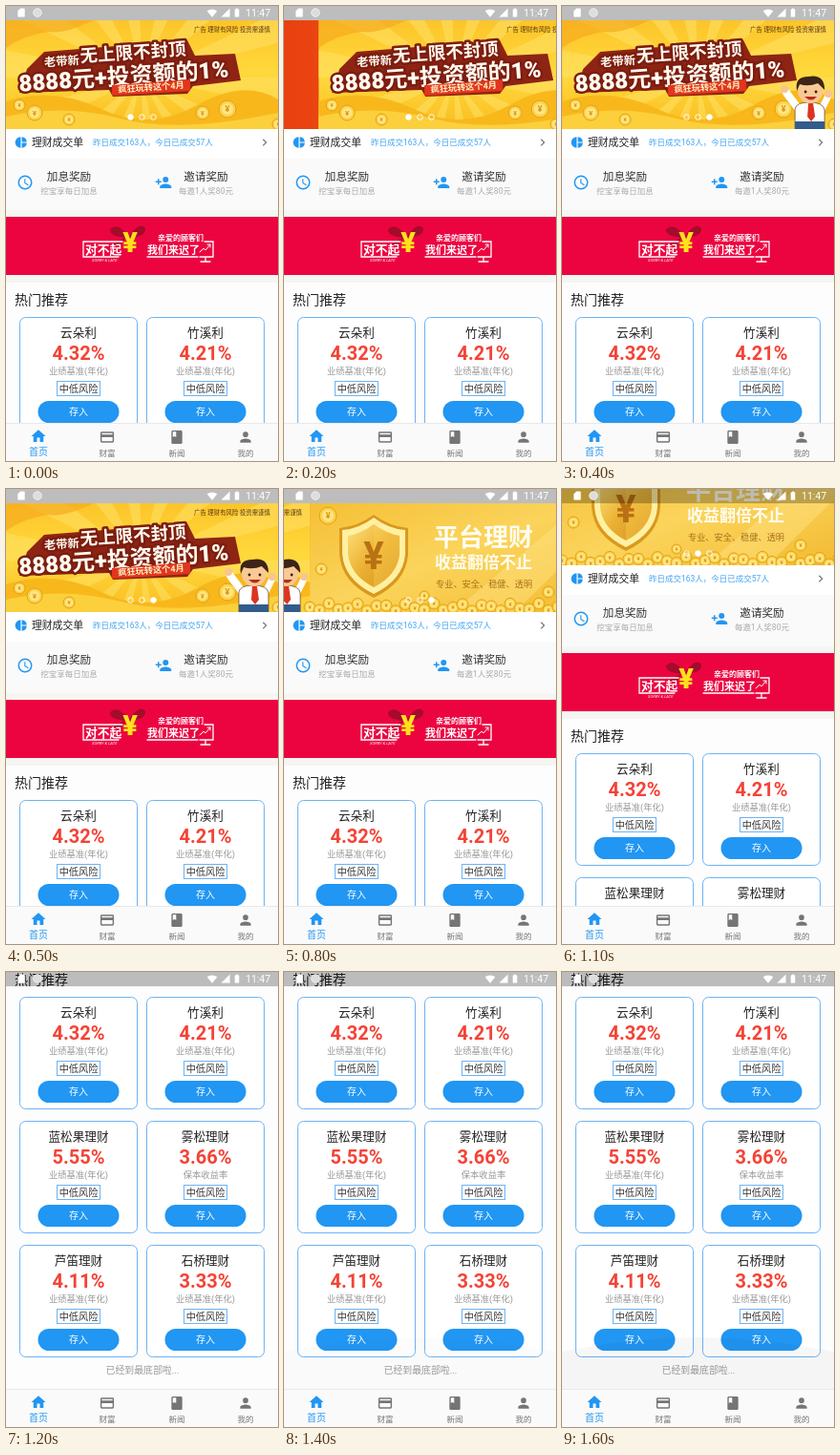
Recreate the animation shown at these times as an HTML page. Size 285x477 px, loop 1900 ms.

```html
<!DOCTYPE html>
<html lang="zh-CN">
<head>
<meta charset="utf-8">
<style>
html, body { margin: 0; width: 100%; height: 100%; overflow: hidden; background: #fff; }
svg { display: block; width: 285px; height: 477px; font-family: Roboto, "Noto Sans CJK SC", sans-serif; }
</style>
</head>
<body>
<svg id="stage" viewBox="0 0 285 477" xmlns="http://www.w3.org/2000/svg"></svg>
<script>
const LOOP = 1900, STEP = 100, W = 285, SCROLL = 300;
const BLUE = '#2196f3', GREY = '#757575';

// Text centred vertically on cy.
const text = (x, cy, size, str, fill, extra = '') =>
  `<text x="${x}" y="${(cy + size * 0.37).toFixed(2)}" font-size="${size}" fill="${fill}" ${extra}>${str}</text>`;
const mid = (x, cy, size, str, fill, extra = '') =>
  text(x, cy, size, str, fill, 'text-anchor="middle" ' + extra);
const rect = (x, y, w, h, fill, extra = '') =>
  `<rect x="${x}" y="${y}" width="${w}" height="${h}" fill="${fill}" ${extra}/>`;
const circle = (x, y, r, fill, extra = '') =>
  `<circle cx="${x}" cy="${y}" r="${r}" fill="${fill}" ${extra}/>`;
const path = (d, fill, extra = '') => `<path d="${d}" fill="${fill}" ${extra}/>`;
const line = (d, color, width) =>
  path(d, 'none', `stroke="${color}" stroke-width="${width}" stroke-linecap="round"`);
// 24-unit icon centred on (x, y).
const icon = (name, x, y, size, fill) =>
  `<g transform="translate(${x - size / 2} ${y - size / 2}) scale(${size / 24})">${path(ICONS[name], fill)}</g>`;

const ICONS = {
  home: 'M10 20v-6h4v6h5v-8h3L12 3 2 12h3v8z',
  card: 'M20 4H4c-1.1 0-2 .9-2 2v12c0 1.1.9 2 2 2h16c1.1 0 2-.9 2-2V6c0-1.1-.9-2-2-2zm0 14H4v-6h16v6zm0-10H4V6h16v2z',
  book: 'M18 2H6c-1.1 0-2 .9-2 2v16c0 1.1.9 2 2 2h12c1.1 0 2-.9 2-2V4c0-1.1-.9-2-2-2zM6 4h5v8l-2.5-1.5L6 12V4z',
  person: 'M12 12a4 4 0 1 0 0-8 4 4 0 0 0 0 8zm0 2c-2.7 0-8 1.3-8 4v2h16v-2c0-2.7-5.3-4-8-4z',
  invite: 'M15 12a4 4 0 1 0 0-8 4 4 0 0 0 0 8zM6 10V7H4v3H1v2h3v3h2v-3h3v-2zm9 4c-2.7 0-8 1.3-8 4v2h16v-2c0-2.7-5.3-4-8-4z',
  clock: 'M12 2a10 10 0 1 0 0 20 10 10 0 0 0 0-20zm0 18a8 8 0 1 1 0-16 8 8 0 0 1 0 16zm.5-13H11v6l5.2 3.2.8-1.3-4.5-2.6z',
  pie: 'M11 2v20a10 10 0 0 1 0-20zm2 0v9h9a10 10 0 0 0-9-9zm0 11v9a10 10 0 0 0 9-9z',
  next: 'M10 6L8.6 7.4l4.6 4.6-4.6 4.6L10 18l6-6z',
  wifi: 'M12 21.5L23.6 7C23 6.600 18.700 3 12 3S1 6.600.4 7z',
  signal: 'M2 22h20V2z',
  battery: 'M15.700 4H14V2h-4v2H8.300C7.600 4 7 4.600 7 5.300v15.400c0 .7.600 1.300 1.300 1.300h7.400c.7 0 1.300-.6 1.300-1.300V5.300C17 4.600 16.400 4 15.700 4z',
  sd: 'M18 2h-8L4 8v12c0 1.100.9 2 2 2h12c1.100 0 2-.9 2-2V4c0-1.100-.9-2-2-2z'
};

const coin = (x, y, r) =>
  circle(x, y, r, '#fbd24a', 'stroke="#e5a013" stroke-width="1"') +
  circle(x, y, r * 0.68, '#ffe584') + mid(x, y, r, '¥', '#dc9614', 'font-weight="700"');

function rays() {
  let s = '';
  for (let i = 0; i < 14; i++) {
    const a = i * Math.PI / 7, b = a + 0.2;
    const p = v => `${(142 + 230 * Math.cos(v)).toFixed(1)} ${(75 + 230 * Math.sin(v)).toFixed(1)}`;
    s += path(`M142 75L${p(a)}L${p(b)}z`, '#ffe36b', 'opacity=".5"');
  }
  return s;
}

function promo() {
  const edge = w => `stroke="#7d1d10" stroke-width="${w}" stroke-linejoin="round" paint-order="stroke"`;
  const bold = (x, y, size, str) => text(x, y, size, str, '#fffdf0', `font-weight="900" ${edge(5)}`);
  return `<g clip-path="url(#page)">` + rect(0, 15, W, 114, 'url(#sun)') + rays() +
    path('M0 100Q50 84 100 108T200 104T285 98V129H0z', '#f8b81c') +
    path('M0 116Q60 102 120 118T285 112V129H0z', '#fbd03c') +
    path('M0 15H92Q60 30 45 27Q20 30 0 44z', '#f6a91c', 'opacity=".65"') +
    coin(30, 112, 8) + coin(14, 104, 6) + coin(66, 119, 6) + coin(206, 112, 7) + coin(232, 108, 9) +
    path('M22 66L40 48L190 36L198 52L240 50L246 78L196 84L190 92L112 95L108 88L14 91z', '#8e2413') +
    `<g transform="rotate(-4 125 70)">` +
    bold(41, 53, 12.3, '老带新') + bold(79, 49, 18.5, '无上限不封顶') + bold(13, 73, 24, '8888元+投资额的1%') +
    '</g>' +
    path('M111 83L193 77V89L111 94z', '#e2361d') +
    mid(152, 85, 9.2, '疯狂玩转这个4月', '#fff3c4', 'font-weight="700" transform="rotate(-4 152 85)"') +
    text(197, 25, 6.400, '广告 理财有风险 投资需谨慎', '#5a3510') + '</g>';
}

function worker() {
  return line('M247 107L235 91', '#fff', 8) + circle(233, 87, 4, '#f8c490') +
    line('M272 108L278 96', '#fff', 7) + circle(279, 92, 4, '#f8c490') +
    path('M244 129V108Q245 101 259 101Q274 101 275 109V129z', '#fff', 'stroke="#633818" stroke-width=".7"') +
    path('M244 121H275V129H244z', '#315c8c') +
    path('M258 102h5l2 14-4 5-4-5z', '#dd3322') +
    circle(260, 89, 13, '#f9c995') +
    path('M246 89Q243 74 258 74Q275 71 275 88Q271 84 268 81Q258 85 249 82z', '#3c2416') +
    circle(255, 90, 1.4, '#32200f') + circle(266, 90, 1.4, '#32200f') +
    path('M254 95Q261 102 267 95z', '#b62d20');
}

function shield() {
  let s = rect(0, 15, W, 114, 'url(#gold)');
  s += path('M285 15L150 129H215L285 60z', '#ffe68d', 'opacity=".4"');
  for (let i = 0; i < 30; i++) s += coin(i * 10, 124 + 4 * Math.sin(i * 2.3), 6);
  s += coin(19, 28, 9) + coin(12, 84, 6) + coin(120, 112, 5) + coin(250, 108, 6);
  s += path('M67 27Q83 39 103 41V68Q101 98 67 114Q33 98 31 68V41Q51 39 67 27z', '#d9981d');
  s += path('M67 30Q83 42 100 43V68Q98 95 67 110Q36 95 34 68V43Q51 42 67 30z', '#fff0a2');
  s += path('M67 37Q81 47 94 49V68Q92 90 67 103Q42 90 40 68V49Q53 47 67 37z', 'url(#metal)');
  s += path('M67 37Q81 47 94 49V68Q92 90 67 103z', '#ffd456', 'opacity=".35"');
  s += mid(67, 69, 40, '¥', '#b97113', 'font-weight="700"');
  s += text(130, 50, 26, '平台理财', '#fffdf0', 'font-weight="700"');
  s += text(131, 77, 17, '收益翻倍不止', '#fffdf0', 'font-weight="700"');
  return s + text(132, 100, 9.2, '专业、安全、稳健、透明', '#a8701a');
}

function notices() {
  return rect(0, 129, W, 31, '#fff') + rect(0, 160, W, 54, '#fafafa') +
    icon('pie', 16, 143, 14, BLUE) +
    text(27, 143, 10.8, '理财成交单', '#222', 'font-weight="500"') +
    text(91, 143, 8.5, '昨日成交163人，今日已成交57人', '#42a5f5') +
    icon('next', 271, 143, 15, '#777') +
    icon('clock', 20, 185, 18, BLUE) + icon('invite', 165, 185, 18, BLUE) +
    mid(66, 179, 11.6, '加息奖励', '#333') + mid(66, 194, 8.5, '挖宝享每日加息', '#aaa') +
    mid(209.5, 179, 11.6, '邀请奖励', '#333') + mid(209.5, 194, 8.5, '每邀1人奖80元', '#aaa') +
    rect(0, 214, W, 76, '#f5f5f2');
}

function apology() {
  const white = 'font-weight="700"';
  return rect(0, 221, W, 61, '#ec0440') +
    path('M128 241Q117 226 109 234Q108 242 128 243Q140 225 146 233Q147 242 128 243z', '#a50b2b') +
    path('M126 242L112 250L119 252z', '#a50b2b') +
    line('M122 247H81V263H118M148 263H201M208 247H217V263H203M209 263V268M204 268H214', '#fff', 1.3) +
    line('M203 258L207 254L209 256L214 250M211 250H214V253', '#fff', 1) +
    text(83, 255, 12.8, '对不起', '#fff', white) +
    text(148, 255, 12.8, '我们来迟了', '#fff', 'font-weight="900" font-size-adjust="none"').replace('12.8"', '11"') +
    text(159, 243, 8, '亲爱的顾客们', '#fff', white) +
    mid(130, 247, 29, '¥', '#ffe11c', 'font-weight="900"') +
    text(90, 266, 4.2, 'SORRY &amp; LATE', '#fff', 'font-style="italic"');
}

const PLANS = [
  ['云朵利', '4.32%'], ['竹溪利', '4.21%'],
  ['蓝松果理财', '5.55%'], ['雾松理财', '3.66%', '保本收益率'],
  ['芦笛理财', '4.11%'], ['石桥理财', '3.33%']
];

function plan([name, rate, basis = '业绩基准(年化)'], i) {
  const x = 14.5 + (i % 2) * 133, y = 326.5 + (i >> 1) * 130;
  return `<g transform="translate(${x} ${y})">` +
    rect(0, 0, 123, 117, '#fff', 'rx="6" stroke="#6db3f5"') +
    mid(61.5, 16, 12.6, name, '#222') +
    mid(61.5, 37, 20, rate, '#f44336', 'font-weight="700"') +
    mid(61.5, 56, 9.3, basis, '#999') +
    rect(39, 67, 45, 15, 'none', 'stroke="#6db3f5"') +
    mid(61.5, 74.5, 10.2, '中低风险', '#333') +
    rect(19, 87.5, 85, 23, BLUE, 'rx="11.5"') + mid(61.5, 99, 10, '存入', '#fff') + '</g>';
}

function nav() {
  const tabs = [['home', '首页', 34], ['card', '财富', 106], ['book', '新闻', 179], ['person', '我的', 251]];
  return rect(0, 437, W, 1, '#e9e9e9') + rect(0, 438, W, 39, '#fafafa') +
    tabs.map(([name, label, x], i) =>
      icon(name, x, i ? 452 : 451, i ? 17 : 18, i ? GREY : BLUE) +
      mid(x, i ? 469 : 467, i ? 8.5 : 10, label, i ? GREY : BLUE)).join('');
}

function statusBar() {
  return rect(0, 0, W, 15, '#000', 'opacity=".26"') +
    icon('sd', 16, 7, 11, '#fff') + circle(33, 7, 4.3, '#ddd', 'stroke="#eee"') +
    icon('wifi', 216, 7.5, 11, '#fff') + icon('signal', 230, 7, 11, '#fff') +
    icon('battery', 242, 7, 11, '#fff') + text(251, 7.3, 10.5, '11:47', '#fff');
}

const grad = (id, dir, ...stops) => `<linearGradient id="${id}" ${dir}>` +
  stops.map((c, i) => `<stop offset="${i / (stops.length - 1)}" stop-color="${c}"/>`).join('') + '</linearGradient>';

document.getElementById('stage').innerHTML = '<defs>' +
  grad('sun', 'x2="0" y2="1"', '#fcc52a', '#ffd93c', '#f9bd22') +
  grad('gold', 'x2="1" y2="1"', '#f5bf35', '#fbd45c', '#f3bb32') +
  grad('metal', 'x2="1" y2="1"', '#ffe27a', '#eab032', '#d3921c') +
  grad('ember', 'x2="1" y2="0"', '#e9400f', '#f4661c') +
  '<clipPath id="page"><rect y="15" width="285" height="114"/></clipPath></defs>' +
  rect(0, 0, W, 477, '#fff') +
  '<g id="list"><g clip-path="url(#page)">' +
  rect(0, 15, W, 114, 'url(#ember)') +
  '<g id="first">' + promo() + '<g id="worker">' + worker() + '</g></g>' +
  '<g id="second">' + shield() + '</g></g>' +
  [0, 1, 2].map(i => circle(130.5 + i * 12, 116.5, 2.8, '#fff', 'class="dot" stroke="#fff" stroke-width="1"')).join('') +
  notices() + apology() + rect(0, 290, W, 460, '#fdfdfd') +
  text(9, 308, 14, '热门推荐', '#222', 'font-weight="500"') +
  PLANS.map(plan).join('') + mid(143, 717, 9.9, '已经到最底部啦...', '#999') + '</g>' +
  path('M0 437V398Q142 368 285 398V437z', '#000', 'id="glow"') +
  nav() + statusBar();

const $ = id => document.getElementById(id);
const dots = [...document.querySelectorAll('.dot')];
const clamp = v => Math.max(0, Math.min(1, v));
const slide = (t, start) => W * Math.pow(1 - clamp((t - start) / 500), 2.57);
const move = (id, x, y) => $(id).setAttribute('transform', `translate(${x.toFixed(2)} ${y.toFixed(2)})`);

function draw(ms) {
  const t = Math.floor((ms % LOOP) / STEP) * STEP;
  const enter = t < 200 ? 0 : slide(t, -76);
  const x = slide(t, 500);
  move('first', t < 500 ? enter : x - W, 0);
  move('second', x, 0);
  $('worker').setAttribute('visibility', t < 300 ? 'hidden' : 'visible');
  const active = t < 300 ? 0 : t < 900 ? 2 : 1;
  dots.forEach((d, i) => d.setAttribute('fill-opacity', i === active ? 1 : 0));
  move('list', 0, t < 1100 ? 0 : t < 1200 ? -49 : -SCROLL);
  $('glow').setAttribute('opacity', 0.03 * clamp((t - 1300) / 300));
}

function tick(now) {
  draw(now);
  requestAnimationFrame(tick);
}
draw(0);
requestAnimationFrame(tick);
</script>
</body>
</html>
```
